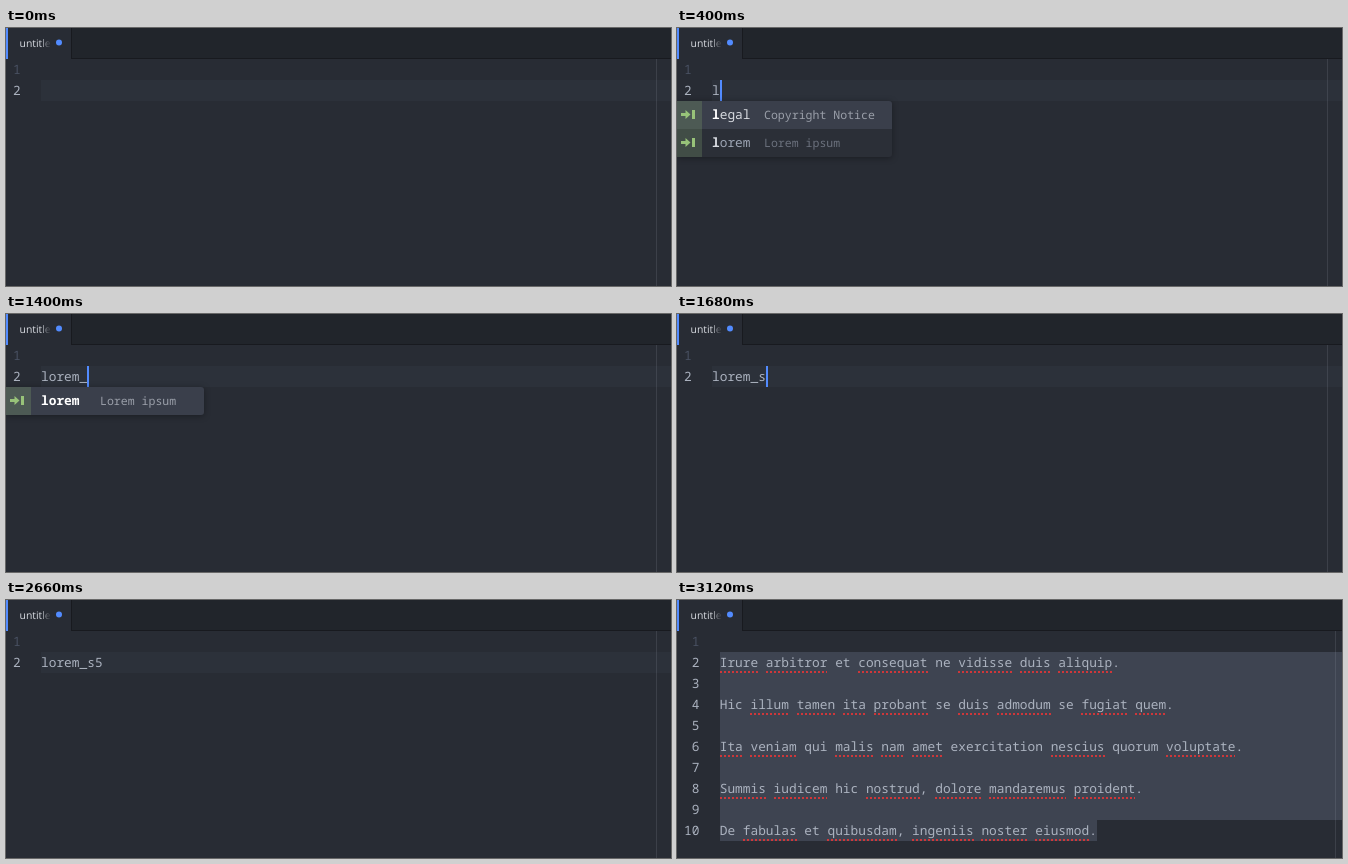
These frames come from a looping animation (665 by 258 pixels, 4840 ms). An HTML page:

```html
<!DOCTYPE html>
<html lang="en">
<head>
<meta charset="utf-8">
<title>Snippet expansion</title>
<style>
  html, body { margin: 0; width: 100%; height: 100%; overflow: hidden; background: #282c34; }
  svg { display: block; width: 665px; height: 258px; }
  text { font: 12.83px "Noto Sans Mono", "DejaVu Sans Mono", monospace; fill: #abb2bf;
         white-space: pre; text-rendering: geometricPrecision; }
  .title { font: 10.4px "Open Sans", "Noto Sans", sans-serif; fill: url(#fade); }
  .number { text-anchor: end; fill: #495162; }
  .number.active { fill: #abb2bf; }
  .guide { fill: #abb2bf; opacity: .15; }
  .typo { stroke: #ff3333; stroke-opacity: .75; stroke-width: 2; stroke-dasharray: 2 2; }
  .popup { filter: drop-shadow(0 1px 3px rgba(0, 0, 0, .35)); }
  .popup .word { fill: #9da5b4; }
  .popup .prefix { font-weight: 700; fill: #d7dae0; }
  .popup .hint { font-size: 11.55px; fill: #6b717d; }
  .popup .selected .word { fill: #d7dae0; }
  .popup .selected .prefix { fill: #fff; }
  .popup .selected .hint { fill: #9a9fa9; font-weight: 500; }
</style>
</head>
<body>
<svg viewBox="0 0 665 258">
  <defs>
    <linearGradient id="fade" gradientUnits="userSpaceOnUse" x1="34" x2="45" y1="0" y2="0">
      <stop stop-color="#d7dae0"/>
      <stop offset="1" stop-color="#d7dae0" stop-opacity="0"/>
    </linearGradient>
    <clipPath id="popupClip"><rect x="-6" y="73" width="0" height="0" rx="3"/></clipPath>
  </defs>
  <rect width="665" height="258" fill="#282c34"/>
  <rect x="65" width="600" height="31" fill="#181a1f"/>
  <rect x="66" width="599" height="30" fill="#21252b"/>
  <rect width="2" height="31" fill="#528bff"/>
  <text class="title" x="13.5" y="19">untitled</text>
  <circle cx="53" cy="14.5" r="3" fill="#528bff"/>
  <g id="editor"></g>
</svg>
<script>
const LOOP = 4840, CHAR = 7.697, LINE = 21, TOP = 31;

const prose = [
  "Irure arbitror et consequat ne vidisse duis aliquip.",
  "Hic illum tamen ita probant se duis admodum se fugiat quem.",
  "Ita veniam qui malis nam amet exercitation nescius quorum voluptate.",
  "Summis iudicem hic nostrud, dolore mandaremus proident.",
  "De fabulas et quibusdam, ingeniis noster eiusmod."
];
const knownWords = new Set("et ne Hic se qui exercitation quorum hic De".split(" "));

const both = { width: 215, hintX: 87, items: [["legal", "Copyright Notice"], ["lorem", "Lorem ipsum"]] };
const single = { width: 198, hintX: 94, items: [["lorem", "Lorem ipsum"]] };

const steps = [
  { at: 0, text: "" },
  { at: 270, text: "l", cursor: true },
  { at: 400, text: "l", cursor: true, popup: both },
  { at: 550, text: "lo", cursor: true, popup: single },
  { at: 690, text: "lore", cursor: true, popup: single },
  { at: 820, text: "lorem", cursor: true, popup: single },
  { at: 1250, text: "lorem", popup: single },
  { at: 1400, text: "lorem_", cursor: true, popup: single },
  { at: 1680, text: "lorem_s", cursor: true },
  { at: 1960, text: "lorem_s", cursor: true, typos: true },
  { at: 2080, text: "lorem_s", typos: true },
  { at: 2230, text: "lorem_s5", cursor: true },
  { at: 2660, text: "lorem_s5" },
  { at: 2820, expanded: true },
  { at: 3120, expanded: true, typos: true }
];

const rowTop = row => TOP + (row - 1) * LINE;
const rect = (x, y, w, h, fill) => `<rect x="${x}" y="${y}" width="${w}" height="${h}" fill="${fill}"/>`;
const label = (x, y, content, name = "") => `<text class="${name}" x="${x}" y="${y}">${content}</text>`;
const codeLine = (x, row, content) => label(x, rowTop(row) + 15, content);
const guide = x => `<rect class="guide" x="${x}" y="${TOP}" width="1" height="227"/>`;

function lineNumbers(count, right) {
  return Array.from({ length: count }, (_, i) =>
    label(right, rowTop(i + 1) + 15, i + 1, i ? "number active" : "number")).join("");
}

function underlines(x, row, content) {
  const y = rowTop(row) + 20;
  return [...content.matchAll(/\w+/g)]
    .filter(([word]) => !knownWords.has(word))
    .map(({ 0: word, index }) => {
      const start = Math.round(x + index * CHAR);
      const end = Math.round(x + (index + word.length) * CHAR);
      return `<path class="typo" d="M${start} ${y}H${end}"/>`;
    }).join("");
}

function popupRow([word, hint], i, popup, prefixLength) {
  const y = 73 + i * 28, last = i === popup.items.length - 1;
  const w = popup.width, r = 3;
  // Only the outer right corners are rounded.
  const shape = `M0 ${y}H${i ? w : w - r}${i ? "" : `q${r} 0 ${r} ${r}`}` +
    `V${last ? y + 28 - r : y + 28}${last ? `q0 ${r} ${-r} ${r}` : ""}H0z`;
  const prefix = word.slice(0, prefixLength), rest = word.slice(prefixLength);
  return `<g class="${i ? "" : "selected"}">
    <path d="${shape}" fill="${i ? "#2b2f37" : "#3a3f4b"}"/>
    ${rect(0, y, 25, 28, i ? "#414d46" : "#4d5a54")}
    <path fill="#98c379" d="M4 ${y + 12}h4.5v-3l5 4.5-5 4.5v-3H4zM15 ${y + 9}h3v9h-3z"/>
    ${label(35, y + 18, `<tspan class="prefix">${prefix}</tspan>${rest}`, "word")}
    ${label(popup.hintX, y + 18, hint, "hint")}</g>`;
}

function typingView({ text, cursor, popup, typos }) {
  const x = 35, y = rowTop(2);
  let out = rect(x, y, 665 - x, LINE, "#2c313a") + guide(650) + lineNumbers(2, 14.7) + codeLine(x, 2, text);
  if (typos) out += underlines(x, 2, text);
  if (cursor) out += rect(Math.round(x + text.length * CHAR), y, 2, LINE, "#528bff");
  if (popup) {
    const rows = popup.items.map((item, i) => popupRow(item, i, popup, text.length));
    out += `<g class="popup">${rows.join("")}</g>`;
  }
  return out;
}

function expandedView({ typos }) {
  const x = 42.7, left = 43, color = "#3e4451";
  let out = rect(left, rowTop(2), 665 - left, 8 * LINE, color) +
    rect(left, rowTop(10), 420 - left, LINE, color) + guide(658) + lineNumbers(10, 22.4);
  prose.forEach((content, i) => {
    const row = 2 + i * 2;
    out += codeLine(x, row, content) + (typos ? underlines(x, row, content) : "");
  });
  return out;
}

const editor = document.getElementById("editor");
const started = performance.now();
let shown;

function draw() {
  const time = (performance.now() - started) % LOOP;
  const step = steps.findLast(s => s.at <= time);
  if (step !== shown) {
    editor.innerHTML = step.expanded ? expandedView(step) : typingView(step);
    shown = step;
  }
  requestAnimationFrame(draw);
}
draw();
</script>
</body>
</html>
```
